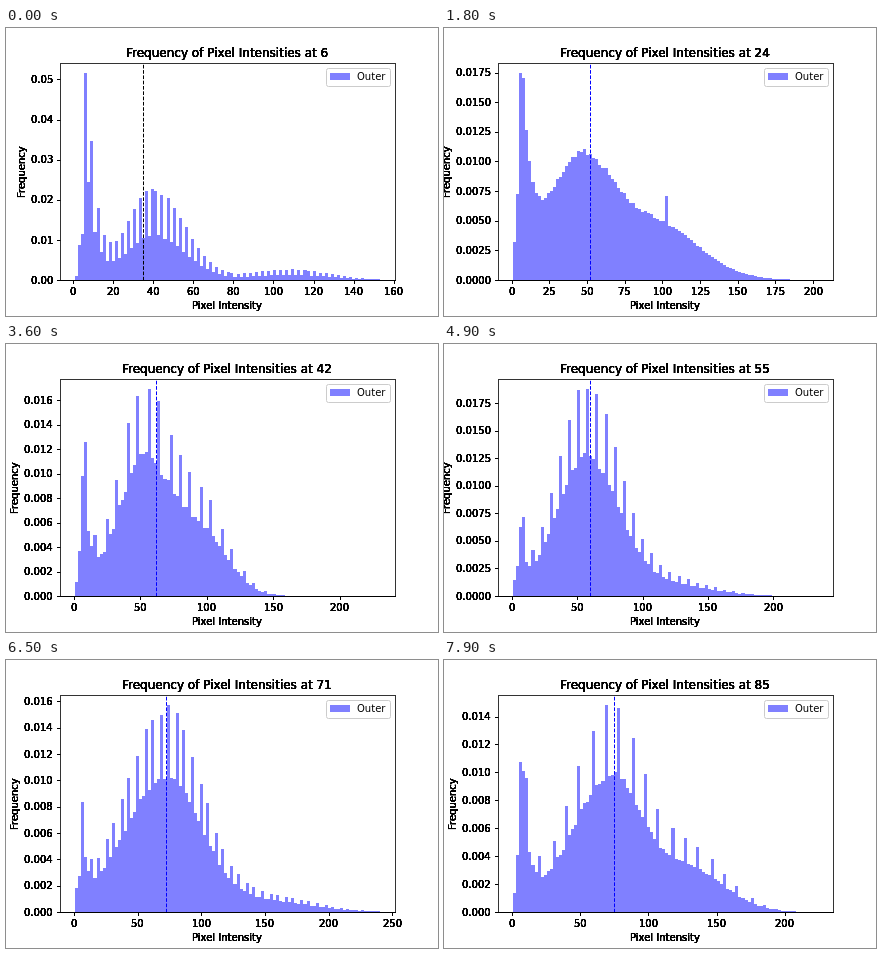
These frames come from a looping animation (432 px wide and 288 px high, 8000 ms). An HTML page with a canvas:

```html
<!DOCTYPE html>
<html>
<head>
<meta charset="utf-8">
<style>
html, body { margin: 0; height: 100%; overflow: hidden; background: #fff; }
canvas { display: block; width: 432px; height: 288px; }
</style>
</head>
<body>
<canvas id="stage" width="432" height="288"></canvas>
<script>
const ctx = document.getElementById('stage').getContext('2d');
const FONT = 'px "DejaVu Sans", sans-serif';
const STEP_MS = 100, STEPS = 80, FIRST = 6, BINS = 100;
const AX = { left: 54, right: 388.8, top: 34.56, bottom: 252 };
const MID_X = (AX.left + AX.right) / 2, MID_Y = (AX.top + AX.bottom) / 2;
const SPAN = (AX.right - AX.left) / 1.1;      // data width inside 5% margins
const START = AX.left + SPAN * 0.05;

// The distribution at a few key steps, heights in 1e-4:
// peak [height, decay], hump [centre, height, left, right], tail [centre, height, width]
const keys = [
  { at: 0, range: [152], mean: [35], peak: [470, 4], hump: [40, 172, 13, 15.5], tail: [108, 20, 19] },
  { at: 10, range: [200], mean: [44.4], peak: [231, 5.5], hump: [40, 107, 22, 28], tail: [105, 23, 30] },
  { at: 25, range: [203], mean: [59], peak: [160, 5], hump: [49, 88, 22, 14], tail: [85, 71, 28] },
  { at: 36, range: [229], mean: [62], peak: [131, 4.5], hump: [52, 126, 19, 19], tail: [95, 60, 20] },
  { at: 49, range: [233], mean: [59.6], peak: [75, 2.8], hump: [57, 144, 23, 23.7], tail: [110, 14, 35] },
  { at: 65, range: [239], mean: [72.5], peak: [65, 3.2], hump: [73, 122, 33, 27], tail: [150, 10, 35] },
  { at: 79, range: [223], mean: [75], peak: [140, 4.7], hump: [73, 107, 29, 22], tail: [130, 34, 26] }
];

function stateAt(step) {
  const i = Math.max(1, keys.findIndex(k => k.at >= step));
  const a = keys[i - 1], b = keys[i], t = (step - a.at) / (b.at - a.at);
  const mix = name => a[name].map((v, j) => v + (b[name][j] - v) * t);
  return {
    range: Math.round(mix('range')[0]), mean: mix('mean')[0],
    peak: mix('peak'), hump: mix('hump'), tail: mix('tail')
  };
}

const bell = (d, width) => Math.exp(-d * d / (2 * width * width));

function share(n, { peak: [height, decay], hump: [c, h, left, right], tail: [tc, th, tw] }) {
  const dark = n < 7 ? (n / 7) ** 3 : Math.exp((7 - n) / decay);
  return height * dark + h * bell(n - c, n < c ? left : right) + th * bell(n - tc, tw);
}

// Whole intensities fall unevenly into the bins, which gives the comb look.
function histogram(state) {
  const bins = new Array(BINS).fill(0), width = state.range / BINS;
  for (let m = 0; m <= state.range; m++) {
    const k = Math.min(BINS - 1, Math.floor(m * BINS / state.range));
    bins[k] += share(m + 1, state) / 1e4 / width;
  }
  return bins.map((d, k) => d * (1 + 0.02 * Math.sin(k * k)));   // slight grain
}

function tickStep(range) {
  const raw = range / 9, unit = 10 ** Math.floor(Math.log10(raw));
  return unit * [1, 2, 2.5, 5, 10].find(s => s * unit >= raw);
}

// Text starts on a whole pixel; anchor is 0 left, 0.5 centre, 1 right.
function text(s, x, y, anchor = 0.5, size = 10, passes = 8) {
  ctx.font = size + FONT;
  ctx.fillStyle = '#000';
  const left = Math.round(x - anchor * ctx.measureText(s).width);
  while (passes--) ctx.fillText(s, left, Math.round(y));   // repeats darken the soft edges
}

function line(x1, y1, x2, y2, color = '#000', dash = []) {
  ctx.strokeStyle = color;
  ctx.lineWidth = 1;
  ctx.setLineDash(dash);
  ctx.beginPath();
  ctx.moveTo(x1, y1);
  ctx.lineTo(x2, y2);
  ctx.stroke();
  ctx.setLineDash([]);
}

const snap = v => Math.round(v) + 0.5;

function drawLegend() {
  ctx.beginPath();
  ctx.roundRect(320.5, 40.5, 64, 18, 2);
  ctx.fillStyle = 'rgba(255,255,255,.8)';
  ctx.fill();
  ctx.strokeStyle = '#ccc';
  ctx.stroke();
  ctx.fillStyle = '#8080ff';
  ctx.fillRect(324, 45, 20, 7);
  text('Outer', 351, 52, 0, 10, 1);
}

function draw(step) {
  const state = stateAt(step), bins = histogram(state);
  const top = Math.max(...bins) * 1.05;
  const px = v => START + (v - 1) * SPAN / state.range;
  const py = v => AX.bottom - v / top * (AX.bottom - AX.top);

  ctx.fillStyle = '#fff';
  ctx.fillRect(0, 0, 432, 288);

  ctx.fillStyle = '#8080ff';
  bins.forEach((d, k) => {
    const x = Math.round(START + k * SPAN / BINS), next = Math.round(START + (k + 1) * SPAN / BINS);
    const y = Math.round(py(d));
    ctx.fillRect(x, y, next - x, AX.bottom - y);
  });

  const meanX = snap(px(state.mean));
  line(meanX, 252.5, meanX, 35, step < 18 ? '#000' : '#00f', [3.7, 1.6]);

  ctx.strokeStyle = '#333';
  ctx.strokeRect(54.5, 35.5, 335, 217);
  line(54, 252.5, 390, 252.5);

  const xStep = tickStep(state.range * 1.1);
  for (let v = 0; px(v) <= AX.right; v += xStep) {
    const x = snap(px(v));
    line(x, 252.5, x, 256);
    text(String(v), px(v), 267);
  }

  const yStep = tickStep(top);
  const digits = [0, 1, 2, 3, 4, 5].find(d => Math.abs(yStep - yStep.toFixed(d)) < 1e-9);
  for (let i = 0; i * yStep <= top; i++) {
    const y = py(i * yStep);
    line(51, snap(y), 54.5, snap(y));
    text((i * yStep).toFixed(digits), 47, y + 3.65, 1);
  }

  text('Pixel Intensity', MID_X, 281);
  text('Frequency of Pixel Intensities at ' + (FIRST + step), MID_X, 29, 0.5, 12);

  ctx.save();
  ctx.translate(Math.round(37.6 - 6.36 * (digits + 1)), Math.round(MID_Y) + 1);
  ctx.rotate(-Math.PI / 2);
  text('Frequency', 0, 0);
  ctx.restore();

  drawLegend();
}

const begin = performance.now();
function tick() {
  draw(Math.floor((performance.now() - begin) / STEP_MS) % STEPS);
  requestAnimationFrame(tick);
}
tick();
</script>
</body>
</html>
```
